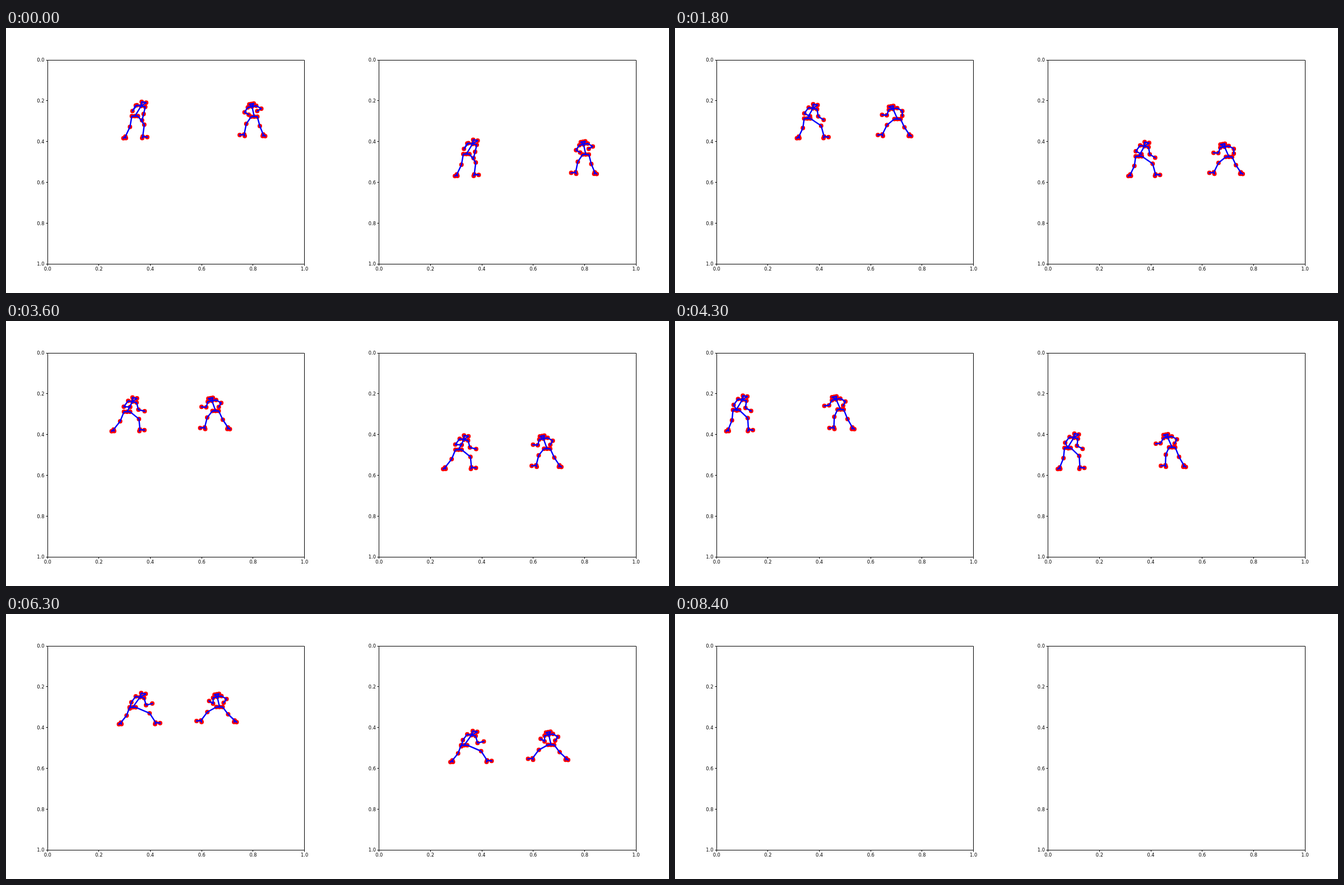
Animation of 1183x473 px, one loop 8500 ms. Source, as an HTML page with a canvas:

```html
<!DOCTYPE html>
<html lang="en">
<head>
<meta charset="utf-8">
<style>
html, body { margin: 0; width: 100%; height: 100%; overflow: hidden; background: #fff; }
canvas { display: block; }
</style>
</head>
<body>
<canvas id="stage" width="1183" height="473"></canvas>
<script>
const ctx = document.getElementById('stage').getContext('2d');
const LOOP = 8500, STEP = 100, BLANK = 8400;
const PANEL = 591.5, DROP = 67.6;
const BOX = { x: 74.2, y: 57.05, w: 458.4, h: 364.2 };

// Each fighter has its own build, a path along the floor and a few stances.
// Distances are in pixels towards the opponent, angles in degrees from straight down.
const left = {
  face: 1, floor: 193.7, headUp: 7.5, kneeBend: 7, upperArm: 13, forearm: 11.5, backElbow: -37,
  path: { 0: 230, 900: 227, 1800: 236, 2300: 219, 2900: 266, 3600: 216, 4050: 104,
    4300: 109, 5400: 208, 6300: 226, 7400: 239.5, 8300: 168 },
  stances: {
    0: { lean: 11, back: -17, front: 14, elbow: -13, hand: -14, backHand: 149 },
    1800: { lean: 10, back: -15, front: 30, elbow: 9, hand: 58, backHand: 63 },
    2900: { lean: 8, back: -34, front: 24, elbow: 37, hand: 90, backHand: 145 },
    4300: { lean: 11, back: -14, front: 22, elbow: -8, hand: 62, backHand: 29 },
    6300: { lean: 13, back: -21, front: 41, elbow: 15, hand: 104, backHand: -14 },
    7400: { lean: 4, back: -10, front: 27, elbow: 24, hand: 36, backHand: -50 }
  }
};
const right = {
  face: -1, floor: 190, headUp: 5.5, kneeBend: 2.5, upperArm: 10.5, forearm: 8.5, backElbow: -60,
  path: { 0: 443, 900: 445, 1800: 397, 2300: 405, 2900: 395.5, 3600: 374,
    4300: 295.5, 5400: 366, 6300: 381, 7400: 346, 8300: 433 },
  stances: {
    0: { lean: 4, back: -16, front: 18, elbow: 34, hand: -60, backHand: 60 },
    1800: { lean: 8, back: -21, front: 27, elbow: 20, hand: 95, backHand: 0 },
    2900: { lean: 5, back: -23, front: 27, elbow: 0, hand: 108, backHand: 34 },
    4300: { lean: 8, back: -21, front: 12, elbow: 29, hand: 84, backHand: 29 },
    6300: { lean: 4, back: -27, front: 33, elbow: 0, hand: 124, backHand: 38 },
    7400: { lean: 2, back: -7, front: 17, elbow: 35, hand: 51, backHand: 0 }
  }
};

const lerp = (a, b, k) => a + (b - a) * k;
const add = (p, x, y) => [p[0] + x, p[1] + y];
const middle = (p, q) => [lerp(p[0], q[0], 0.5), lerp(p[1], q[1], 0.5)];

// The keys on both sides of t, wrapping at the end of the loop, and the share between them.
function around(track, t) {
  const times = Object.keys(track).map(Number);
  const i = times.findLastIndex(time => time <= t);
  const next = times[i + 1] ?? LOOP;
  return [track[times[i]], track[next % LOOP], (t - times[i]) / (next - times[i])];
}

function stanceAt(fighter, t) {
  const [a, b, k] = around(fighter.stances, t);
  return Object.fromEntries(Object.keys(a).map(name => [name, lerp(a[name], b[name], k)]));
}

function arm(fighter, shoulder, elbowAngle, handAngle) {
  const swing = (p, length, deg) =>
    add(p, length * Math.sin(deg * Math.PI / 180), length * Math.cos(deg * Math.PI / 180));
  const elbow = swing(shoulder, fighter.upperArm, elbowAngle);
  return [shoulder, elbow, swing(elbow, fighter.forearm, handAngle)];
}

function leg(fighter, hip, step, isFront) {
  const bend = fighter.kneeBend;
  const ankle = [step, fighter.floor];
  const knee = add(middle(hip, ankle), isFront ? bend : bend * 0.35, isFront ? -3 : 1);
  const toe = isFront ? add(ankle, 8, 1) : add(ankle, -3.5, 3);
  const heel = add(ankle, isFront ? -1 : 1, 2.7);
  return [hip, knee, ankle, heel, ankle, toe];
}

// All chains of joints, with x measured from the hips towards the opponent.
function skeleton(fighter, t) {
  const s = stanceAt(fighter, t);
  const pelvis = [0, 148 + 0.3 * (s.front - s.back)];  // a wider stance is lower
  const neck = add(pelvis, s.lean, -18);
  const crown = add(neck, 0.6 * s.lean - 5.5, -fighter.headUp);
  const brow = add(crown, 8, 1.5);
  const nose = fighter === right ? middle(crown, brow) : brow;
  const frontArm = arm(fighter, add(neck, 7.5, 1.5), s.elbow, s.hand);
  const backArm = arm(fighter, add(neck, -7.5, -1.5), fighter.backElbow, s.backHand);
  return [
    [neck, crown, nose, brow, neck, pelvis],
    [neck, ...frontArm], [neck, ...backArm],
    [pelvis, ...leg(fighter, add(pelvis, 5.5, 0), s.front, true)],
    [pelvis, ...leg(fighter, add(pelvis, -5.5, 0), s.back, false)]
  ];
}

function drawFighter(fighter, t) {
  const x = lerp(...around(fighter.path, t));
  const chains = skeleton(fighter, t).map(chain =>
    chain.map(p => [x + fighter.face * p[0], p[1]]));

  ctx.fillStyle = '#f00';
  ctx.beginPath();
  for (const [cx, cy] of chains.flat()) {
    ctx.moveTo(cx + 4, cy);
    ctx.arc(cx, cy, 4, 0, 2 * Math.PI);
  }
  ctx.fill();

  ctx.strokeStyle = '#00f';
  ctx.lineWidth = 2.46;
  ctx.lineCap = 'square';
  ctx.lineJoin = 'round';
  ctx.beginPath();
  for (const chain of chains) chain.forEach((p, i) => i ? ctx.lineTo(...p) : ctx.moveTo(...p));
  ctx.stroke();
}

function drawAxes(offset) {
  const { y, w, h } = BOX, x = BOX.x + offset;
  const snap = n => Math.floor(n) + 0.5;
  const x0 = snap(x), x1 = snap(x + w), y0 = snap(y), y1 = snap(y + h);
  ctx.strokeStyle = ctx.fillStyle = '#000';
  ctx.lineWidth = 1;
  ctx.lineCap = 'butt';
  ctx.lineJoin = 'miter';
  ctx.font = '8.22px "DejaVu Sans", sans-serif';
  ctx.beginPath();
  ctx.rect(x0, y0, x1 - x0, y1 - y0);
  for (let i = 0; i <= 5; i++) {
    const label = (i / 5).toFixed(1), tx = x + w * i / 5, ty = y + h * i / 5;
    ctx.moveTo(snap(tx), y1);
    ctx.lineTo(snap(tx), y1 + 3);
    ctx.moveTo(x0, snap(ty));
    ctx.lineTo(x0 - 3, snap(ty));
    ctx.textAlign = 'center';
    ctx.fillText(label, tx, y + h + 12);
    ctx.textAlign = 'right';
    ctx.fillText(label, x - 5.8, ty + 3.1);
  }
  ctx.stroke();
}

function frame() {
  const t = Math.floor(performance.now() % LOOP / STEP) * STEP;
  ctx.fillStyle = '#fff';
  ctx.fillRect(0, 0, 1183, 473);
  for (const panel of [0, 1]) {
    drawAxes(panel * PANEL);
    ctx.save();
    ctx.translate(panel * PANEL, panel * DROP);
    if (t < BLANK) [left, right].forEach(fighter => drawFighter(fighter, t));
    ctx.restore();
  }
  requestAnimationFrame(frame);
}
frame();
</script>
</body>
</html>
```
